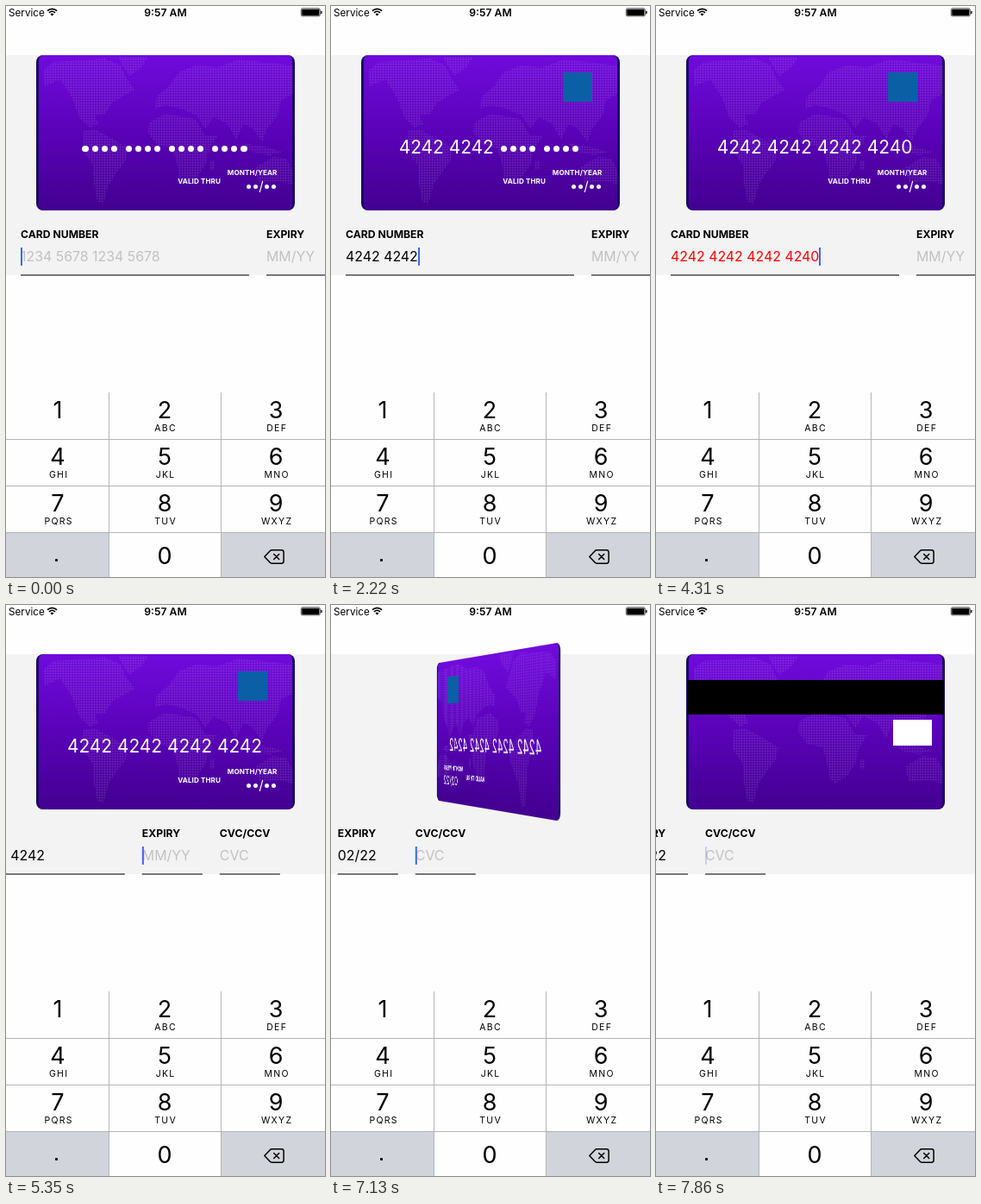
These frames come from a looping animation (370 px wide and 662 px high, 8 s). An HTML page:

```html
<!DOCTYPE html>
<html lang="en">
<head>
<meta charset="utf-8">
<title>Card form</title>
<style>
  html, body { margin: 0; width: 100%; height: 100%; overflow: hidden; background: #fefefe; }
  #stage {
    position: relative; width: 370px; height: 662px; overflow: hidden;
    background: #fefefe; color: #000; font: 400 15.9px/20px Inter, "Open Sans", sans-serif;
  }
  #stage div, #stage svg { position: absolute; }
  #stage div { white-space: pre; }

  .status { top: -2.4px; font-size: 11.7px; }
  #clock { left: 0; width: 370px; text-align: center; font-size: 12.2px; font-weight: 600; }
  #band { left: 0; top: 57px; width: 370px; height: 255px; background: #f3f3f3; }

  #card { left: 35px; top: 57px; width: 300px; height: 180px; border-radius: 8px; overflow: hidden; background: #170c66; color: #fff; }
  #paint { inset: 0 3px; border-radius: 6px; background: linear-gradient(#700bdc, #5a02b8 50%, #430090); }
  #map { left: 0; top: 0; }
  #front, #back { inset: 0; }
  #logo { left: 234px; top: 20px; width: 34px; height: 34px; background: #0b5fa5; }
  #cardNum { left: 0; top: 97.4px; width: 298px; text-align: center; font-size: 20.9px; }
  #cardExp { right: 20.5px; top: 141.5px; font-size: 15px; }
  .tiny { font-size: 8.1px; font-weight: 700; letter-spacing: .1px; }
  #thru { right: 86px; top: 136px; }
  #month { right: 20.5px; top: 126px; }
  #card i {
    display: inline-block; width: .34em; height: .34em; margin: 0 .096em;
    border-radius: 50%; vertical-align: .12em; background: #fff;
  }
  #stripe { left: 1px; right: 1px; top: 30px; height: 40px; background: #000; }
  #code { left: 239.5px; top: 76px; width: 45.5px; height: 30px; background: #fff; }

  #fields { left: 0; top: 0; }
  .field { top: 254px; height: 57px; border-bottom: 2px solid #777779; }
  .label { left: 0; top: .5px; font-size: 12.2px; font-weight: 700; }
  .value { left: 0; top: 27px; }
  .hint { left: 0; top: 27px; color: #c1c1c5; }
  #caret { top: 26px; width: 2px; height: 21px; background: #4066ea; }

  .key { height: 54px; text-align: center; }
  .key .digit { left: 0; right: 1px; top: 8.7px; line-height: 24px; font-size: 27px; }
  .key .abc { left: 1.3px; right: 0; top: 31.7px; font-size: 10.5px; letter-spacing: 1.3px; }
  .grey { background: #d1d4da; }
  .rule { background: #b4b5b8; }
</style>
</head>
<body>
<div id="stage">
  <div class="status" style="left:3px">Service</div>
  <div class="status" id="clock">9:57 AM</div>
  <svg width="370" height="16" style="left:0;top:0">
    <g fill="none" stroke="#000" stroke-width="1.7">
      <path d="M48 5.6a7.8 7.8 0 0 1 11 0M50 7.900a5 5 0 0 1 7 0"/>
    </g>
    <path d="M53.5 11.6l-2-2.2a2.9 2.9 0 0 1 4 0z"/>
    <rect x="342.3" y="2.800" width="22" height="9" rx="1.800" fill="none" stroke="#000" stroke-width=".7"/>
    <rect x="343.2" y="3.700" width="20.200" height="7.200" rx=".8"/>
    <rect x="365.2" y="5.700" width="1.300" height="3.400" rx=".6"/>
  </svg>

  <div id="band"></div>

  <div id="card">
    <div id="paint"></div>
    <svg id="map" width="300" height="180">
      <defs>
        <pattern id="dots" width="3" height="3" patternUnits="userSpaceOnUse">
          <circle cx="1.5" cy="1.5" r=".95" fill="#fff" fill-opacity=".15"/>
        </pattern>
      </defs>
      <g fill="url(#dots)">
        <path d="M8 18L20 8 50 6 80 4 98 12 104 26 114 40 100 48 88 55 80 68 68 70 72 80 62 84 50 72 42 50 28 28 10 36z"/>
        <path d="M95 2L130 2 122 14 108 24 100 12z"/>
        <path d="M55 88L68 86 85 95 107 108 104 122 92 138 84 150 78 173 71 170 67 150 66 128 54 110z"/>
        <path d="M131 78L150 68 185 74 195 92 210 94 200 110 197 126 186 142 173 150 167 146 163 125 158 108 140 104 130 90z"/>
        <path d="M138 62L140 48 155 35 165 20 185 12 210 14 235 5 298 12 298 45 284 52 280 70 268 85 262 100 250 84 240 80 232 98 222 80 206 72 196 85 186 70 168 62 150 58z"/>
        <path d="M254 130L275 118 290 120 298 135 298 150 282 146 258 148z"/>
        <path d="M240 102L264 106 286 112 270 116 250 112zM202 122h5v11h-5z"/>
      </g>
    </svg>
    <div id="front">
      <div id="logo"></div>
      <div id="cardNum"></div>
      <div id="thru" class="tiny">VALID THRU</div>
      <div id="month" class="tiny">MONTH/YEAR</div>
      <div id="cardExp"></div>
    </div>
    <div id="back">
      <div id="stripe"></div>
      <div id="code"></div>
    </div>
  </div>

  <div id="fields"></div>
  <div id="keys"></div>

  <svg width="26" height="20" style="left:298px;top:628px" fill="none" stroke="#000" stroke-width="1.5" stroke-linejoin="round" stroke-linecap="round">
    <path d="M1.8 10.5L8 4q1-1.2 2.4-1.2H21.5q2.6 0 2.6 2.6V15.6q0 2.6-2.6 2.6H10.4Q9 18.2 8 17z"/>
    <path d="M12.7 7.5l6 6m0-6l-6 6"/>
  </svg>
</div>

<script>
const LOOP = 8000, STEP = 148.3, LEAD = 10, LAST = 53;
const $ = id => document.getElementById(id);

function add(parent, cls, css = "", text = "") {
  const el = document.createElement("div");
  el.className = cls;
  el.style.cssText = css;
  el.textContent = text;
  parent.append(el);
  return el;
}

// Keypad
const letters = ["", "ABC", "DEF", "GHI", "JKL", "MNO", "PQRS", "TUV", "WXYZ"];
const cols = [[0, 121], [120, 129], [250, 127]];
function key(col, y, digit, abc) {
  const [x, w] = cols[col];
  const el = add($("keys"), "key", `left:${x}px;top:${y}px;width:${w}px`);
  add(el, "digit", "", digit);
  add(el, "abc", "", abc);
}
add($("keys"), "grey", "left:0;top:610px;width:119px;height:52px");
add($("keys"), "grey", "left:250px;top:610px;width:120px;height:52px");
letters.forEach((abc, i) => key(i % 3, 448 + 54 * Math.floor(i / 3), i + 1, abc));
key(1, 617, 0, "");
add($("keys"), "", "left:57px;top:640.5px;width:3.4px;height:3.4px;border-radius:1px;background:#000");
for (const y of [502, 556, 610]) add($("keys"), "rule", `left:0;top:${y}px;width:370px;height:1px`);
for (const x of [119, 249]) add($("keys"), "rule", `left:${x}px;top:448px;width:1px;height:214px`);

// Input row
function field(x, w, label, hint) {
  const box = add($("fields"), "field", `left:${x}px;width:${w}px`);
  add(box, "label", "", label);
  const hintEl = add(box, "hint", "", hint);
  const value = add(box, "value");
  return {
    box, value,
    set(text) {
      value.textContent = text;
      hintEl.style.display = text ? "none" : "block";
    }
  };
}
const number = field(17, 265, "CARD NUMBER", "1234 5678 1234 5678");
const expiry = field(302, 70, "EXPIRY", "MM/YY");
const cvc = field(392, 70, "CVC/CCV", "CVC");
const caret = add(number.box, "");
caret.id = "caret";

// Ticks at which each digit is typed
const presses = [4, 5, 7, 8, 11, 12, 14, 15, 18, 19, 20, 21, 24, 25, 28, 29];
const FIX = 32, TO_EXPIRY = 35, TO_CVC = 47;

const group = s => s.replace(/(.{4})(?=.)/g, "$1 ");
const slash = s => s.length > 2 ? s.slice(0, 2) + "/" + s.slice(2) : s;
const dotted = s => s.replace(/•/g, "<i></i>");

function ease(now, start, length) {
  const x = Math.min(1, Math.max(0, (now - start) / length));
  return x * x * (3 - 2 * x);
}

function numberAt(tick) {
  const full = "42".repeat(8);
  if (tick >= TO_EXPIRY) return full;
  if (tick >= FIX) return full.slice(0, 15);
  const n = presses.filter(p => p <= tick).length;
  return n === 16 ? full.slice(0, 15) + "0" : full.slice(0, n);
}

function expiryAt(tick) {
  return tick >= TO_CVC ? "0222" : tick >= 44 ? "022" : tick >= 40 ? "02" : "";
}

function caretAlpha(tick) {
  if (tick < 4) return [1, .45, 0, 0][tick];
  return tick < 52 ? 1 : tick === 52 ? .7 : .25;
}

function draw(tick) {
  const now = tick * STEP;
  const num = numberAt(tick), exp = expiryAt(tick);

  number.set(group(num));
  number.value.style.color = num.endsWith("0") ? "#f00" : "#000";
  expiry.set(slash(exp));
  cvc.set("");
  $("cardNum").innerHTML = dotted(group(num.padEnd(16, "•")));
  $("cardExp").innerHTML = dotted(slash(exp.padEnd(4, "•")));
  $("logo").style.display = num ? "block" : "none";

  const active = tick < TO_EXPIRY ? number : tick < TO_CVC ? expiry : cvc;
  active.box.append(caret);
  caret.style.left = active.value.getBoundingClientRect().width + "px";
  caret.style.opacity = caretAlpha(tick);

  const shift = 265 * ease(now, 5180, 300) + 70 * ease(now, 6985, 300);
  $("fields").style.transform = `translateX(${-shift}px)`;

  // The face seen from behind swings round to the back
  const turn = ease(now, 6842, 700);
  const angle = turn > 0 ? 180 - 180 * turn : 0;
  $("card").style.transform = angle ? `perspective(1000px) rotateY(${angle}deg)` : "none";
  $("front").style.display = turn < .5 ? "block" : "none";
  $("back").style.display = turn < .5 ? "none" : "block";
}

const begin = performance.now();
let last = -1;
function loop() {
  const time = (performance.now() - begin) % LOOP;
  const tick = Math.min(LAST, Math.floor((time + LEAD) / STEP));
  if (tick !== last) draw(last = tick);
  requestAnimationFrame(loop);
}
loop();
</script>
</body>
</html>
```
